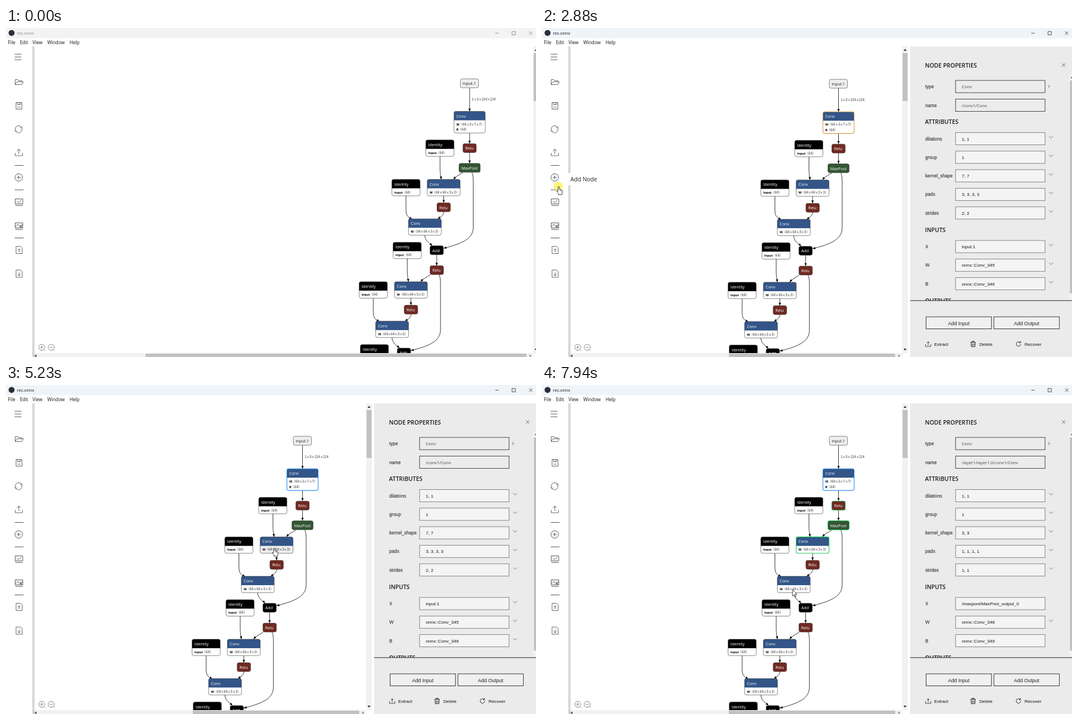
These frames come from a looping animation (950 px wide and 590 px high, 8 s). An HTML page with a canvas:

```html
<!DOCTYPE html>
<html lang="en">
<head>
<meta charset="utf-8">
<title>Graph editor</title>
<style>
html, body { margin: 0; width: 100%; height: 100%; overflow: hidden; background: #fff; }
canvas { display: block; }
</style>
</head>
<body>
<canvas width="950" height="590"></canvas>
<script>
const ctx = document.querySelector('canvas').getContext('2d');
const LOOP = 8000;
const UI = '"Open Sans", sans-serif', ARIAL = '"Liberation Sans", sans-serif', SHAPE = '"Noto Sans CJK SC", "Noto Sans CJK", sans-serif';
const BLUE = '#335588', RED = '#702921', GREEN = '#335533';

// Moments at which the state jumps
const T = { focus: 2170, slide: 2260, slid: 2500, menu1: 3720, pick1: 4300, select2: 5380, menu2: 6060, pick2: 7310 };

// Pointer track: time, x, y
const POINTER = [
  [300, 250, 592], [640, 96, 264], [1080, 420, 592],
  [1400, 330, 228], [1660, 607, 206], [2000, 815, 168], [2640, 820, 170], [2860, 30, 285], [2960, 30, 285],
  [3410, 718, 562], [3810, 720, 566], [3980, 720, 566], [4060, 721, 554], [4290, 721, 553], [4830, 486, 296], [5230, 481, 293],
  [5380, 481, 293], [5700, 660, 453], [5770, 660, 453], [6060, 724, 567], [6340, 724, 567], [6400, 723, 555],
  [6630, 724, 550], [6900, 724, 550], [7090, 721, 522], [7310, 721, 522], [7940, 449, 367]
];

const within = (t, a, b) => t >= a && t < b;
const lerp = (a, b, p) => a + (b - a) * p;

function text(s, x, y, size, family = UI, color = '#000', weight = 400, align = 'left') {
  ctx.font = `${weight} ${size}px ${family}`;
  ctx.fillStyle = color;
  ctx.textAlign = align;
  ctx.fillText(s, x, y);
}
function rect(x, y, w, h, fill, stroke, line = 1) {
  if (fill) { ctx.fillStyle = fill; ctx.fillRect(x, y, w, h); }
  if (stroke) { ctx.strokeStyle = stroke; ctx.lineWidth = line; ctx.strokeRect(x, y, w, h); }
}
function stroke(d, color = '#000', line = 0.9) {
  ctx.strokeStyle = color;
  ctx.lineWidth = line;
  ctx.stroke(new Path2D(d));
}
function fill(d, color) {
  ctx.fillStyle = color;
  ctx.fill(new Path2D(d));
}
function at(x, y, draw) {
  ctx.save();
  ctx.translate(x, y);
  draw();
  ctx.restore();
}
function clipped(x, y, w, h, draw) {
  ctx.save();
  ctx.beginPath();
  ctx.rect(x, y, w, h);
  ctx.clip();
  draw();
  ctx.restore();
}
function rounded(x, y, w, h, radii, color, border, line) {
  ctx.beginPath();
  ctx.roundRect(x, y, w, h, radii);
  if (color) { ctx.fillStyle = color; ctx.fill(); }
  if (border) { ctx.strokeStyle = border; ctx.lineWidth = line; ctx.stroke(); }
}

// Graph -----------------------------------------------------------------

function node(x, y, w, label, color, rows = [], mark, body = '#fff') {
  const h = rows.length ? 20 + 9.4 * rows.length : 16;
  if (rows.length) rounded(x, y, w, h, 3.3, body);
  rounded(x, y, w, 16, rows.length ? [3.3, 3.3, 0, 0] : 3.3, color);
  text(label, x + 4.3, y + 11, 7.2, UI, color === '#eee' ? '#222' : '#fff');
  rows.forEach(([name, shape], i) => {
    const base = y + 25 + 9.4 * i;
    text(name, x + 4.3, base, 5.6, UI, '#000', 700);
    const nameWidth = ctx.measureText(name).width;
    text(`〈${shape}〉`, x + 4.3 + nameWidth, base, 5.7, SHAPE, '#222');
  });
  rounded(x, y, w, h, 3.3, null, mark || '#333', mark ? 1.1 : 0.6);
}

// A curve ending in an arrowhead at (x, y) that points along `angle` degrees
function edge(d, x, y, angle = 90) {
  stroke(`${d} ${x},${y}`, '#000', 0.8);
  at(x, y, () => {
    ctx.rotate(angle * Math.PI / 180);
    fill('M0,0L-5,-2.1V2.1Z', '#000');
  });
}

function residualBlock(convMark, convBody) {
  edge('M778,230V250C778,260 779,266', 780, 271.5, 84);
  edge('M819,259C812,264 806,266', 802, 271.5, 130);
  edge('M717,301V326C717,336 720,339', 728, 343, 32);
  edge('M784.5,301L', 784.5, 313.5);
  edge('M785,329.5C784,336 780,338', 774, 342.5, 142);
  edge('M750.5,371.5C751,381 758,385', 764, 390.5, 45);
  edge('M835,259C838,265 837.5,272 837.5,290V358C837.5,380 812,388', 784.5, 395, 166);
  edge('M772,407L', 772, 426);
  const identity = [['input', '64']], weights = [['W', '64×64×3×3']];
  node(752.5, 200.8, 50.5, 'Identity', '#000', identity);
  node(691.7, 271.6, 50.5, 'Identity', '#000', identity);
  node(755, 271.6, 59, 'Conv', BLUE, weights, convMark, convBody);
  node(772.5, 313.6, 24.2, 'Relu', RED);
  node(721.3, 342.2, 59, 'Conv', BLUE, weights);
  node(760, 390.6, 24, 'Add', '#000');
  node(760, 426.2, 24.2, 'Relu', RED);
}

function graph(t) {
  const mark1 = t >= T.pick1 ? '#2b8ceb' : t >= T.focus ? '#d99a45' : null;
  const mark2 = t >= T.pick2 ? '#22c95a' : t >= T.select2 ? '#d99a45' : null;
  const pathMark = t >= T.pick2 ? '#22a94c' : null;
  edge('M831,107.5L', 831, 149.5);
  edge('M831,188L', 831, 207);
  edge('M831,223L', 831, 242.5);
  text('1×3×224×224', 835, 130, 5.7, SHAPE, '#222');
  node(814.5, 91.2, 32.5, 'input.1', '#eee');
  node(803, 149.5, 56, 'Conv', BLUE, [['W', '64×3×7×7'], ['B', '64']], mark1);
  node(819, 207.4, 24, 'Relu', RED, [], pathMark);
  for (let i = 0; i < 3; i++) {
    at(-58.7 * i, 183.5 * i, () => residualBlock(i ? null : mark2, !i && within(t, 4780, T.select2 + 60) ? '#eee' : '#fff'));
  }
  node(812, 242.8, 38, 'MaxPool', GREEN, [], pathMark);
}

function scrollbars(p) {
  const right = lerp(945, 645.5, p), end = lerp(933, 633, p);
  rect(49, 583, right - 49, 7, '#f1f1f1');
  rect(lerp(250, 335, p), 584, end - lerp(250, 335, p), 6, '#c1c1c1');
  fill('M51,588L54.5,585.5V590Z', '#333');
  fill(`M${end + 9},588L${end + 5.5},585.5V590Z`, '#888');
  rect(right, 33, 10.5, 550, '#f1f1f1');
  rect(right + 0.8, 45, 9, 86, '#c1c1c1');
  fill(`M${right + 2.5},41H${right + 8}L${right + 5.2},37.5Z`, '#333');
  fill(`M${right + 2.5},575H${right + 8}L${right + 5.2},578.5Z`, '#333');
}

// Window frame ------------------------------------------------------------

function frame(focused) {
  rect(0, 0, 950, 18.5, focused ? '#eff4f9' : '#f3f3f3');
  ctx.beginPath();
  ctx.arc(10, 8.8, 5.4, 0, 7);
  ctx.fillStyle = '#2b2e3a';
  ctx.fill();
  text('res.onnx', 19.5, 12, 7.7, UI, focused ? '#111' : '#8b8b8b');
  const tone = focused ? '#222' : '#777';
  stroke('M877,9.3H883M907,6.3h6v6h-6zM937.5,6.2l6,6m0,-6l-6,6', tone, 0.8);
  [['File', 3.5], ['Edit', 25], ['View', 47.5], ['Window', 74], ['Help', 114]]
    .forEach(([s, x]) => text(s, x, 29.3, 8.3, UI, '#111'));
}

function sidebar() {
  rect(0, 33, 48, 557, '#fff');
  const shade = ctx.createLinearGradient(47, 0, 53, 0);
  shade.addColorStop(0, '#0004');
  shade.addColorStop(1, '#0000');
  rect(47.5, 33, 6, 557, shade);
  const upload = 'M16.5,224v5h13v-5M23,226v-9m-3.5,3.5l3.5,-3.5l3.5,3.5';
  const page = 'M18,392v12.500h11v-10l-3,-3h-8zm5.500,10';
  const arrowUp = 'v-6m-2.500,2.500l2.500,-2.500l2.500,2.500';
  const ink = '#4d545c';
  stroke('M15.500,47h12M15.500,52h12M15.500,57h12', ink, 1);
  stroke('M16.500,101.500v-9h4.500l1.500,2h6v2M16.500,101.500l3,-5h11.500l-2.500,5z', ink);
  stroke('M18,133.500h10.500v12h-10.500zM20.500,133.500v4h5.500v-4M24,134.500v2M20.500,142h5.500', ink);
  stroke('M17.500,185A6.500,6.500 0 0 1 21.500,175.200M18.500,186.500A6.500,6.500 0 0 0 23.500,188M27.500,178A6.500,6.500 0 0 1 24,187.800M21,175.200A6.500,6.500 0 0 1 27,177M15.500,183.500l2,2.500l2.500,-1.500M29.500,179.500l-2,-2.500l-2.500,1.500', ink);
  stroke(upload, ink);
  stroke('M15.500,246.500h16M15.500,290.300h16M15.500,376.500h16', ink, 1);
  stroke('M16,268a6.700,6.700 0 1 0 13.400,0a6.700,6.700 0 1 0 -13.400,0M22.700,264.500v7M19.200,268h7', ink, 1);
  const screen = 'M16.500,306.500h13.500v9h-13.500zM16.500,318.300h13.500';
  stroke(screen + 'M20,311l2.500,2.500l4.500,-4.500', ink, 1);
  at(0, 43, () => stroke(screen + 'M17,313l4,-4l4,4l5,-4M25,311l4,4m0,-4l-4,4', ink, 1));
  stroke(page + arrowUp, ink);
  at(0, 42.500, () => stroke(page + 'v-6m-2.500,3.500l2.500,2.500l2.500,-2.500', ink));
  for (const [x, sign] of [[64, 'M-2.500,0h5M0,-2.500v5'], [81, 'M-2.500,0h5']]) {
    at(x, 572.6, () => stroke('M-5.300,0a5.300,5.300 0 1 0 10.600,0a5.300,5.300 0 1 0 -10.600,0M3.800,3.800l2.500,2.500' + sign, '#666', 0.8));
  }
}

// Property panel -----------------------------------------------------------

const FIELDS = {
  conv1: { name: '/conv1/Conv', values: ['1, 1', '1', '7, 7', '3, 3, 3, 3', '2, 2'], inputs: ['input.1', 'onnx::Conv_345', 'onnx::Conv_346'], open: [1, 1, 1] },
  conv2: { name: '/layer1/layer1.0/conv1/Conv', values: ['1, 1', '1', '3, 3', '1, 1, 1, 1', '1, 1'], inputs: ['/maxpool/MaxPool_output_0', 'onnx::Conv_348', 'onnx::Conv_349'], open: [0, 1, 0] }
};

function field(label, value, y, chevron, family = ARIAL) {
  const fixed = family === UI;
  text(label, 687, y + 14, 8.2, ARIAL, '#111');
  rect(741.3, y, 160.4, 22, fixed ? '#ececec' : '#f4f4f4', fixed ? '#333' : '#777', 0.9);
  text(value, 752.5, y + 14, fixed ? 7.7 : 8.1, family, fixed ? '#444' : '#111');
  if (chevron) stroke(`M909,${y + 6.5}l3.500,3.500l3.500,-3.500`, '#555', 0.8);
}
function heading(s, y) {
  text(s, 686.5, y, 10.4, UI, '#1a1a1a', 600);
}

function panel(t) {
  const data = t < T.select2 ? FIELDS.conv1 : FIELDS.conv2;
  rect(660, 33, 290, 557, '#ebebeb');
  heading('NODE PROPERTIES', 71.3);
  stroke('M932,63.500l6,6m0,-6l-6,6', '#555', 0.9);
  clipped(660, 80, 290, 409, () => {
    field('type', 'Conv', 94, false, UI);
    text('?', 907, 108, 8, UI, '#222');
    field('name', data.name, 127.5, false, UI);
    heading('ATTRIBUTES', 172);
    ['dilations', 'group', 'kernel_shape', 'pads', 'strides']
      .forEach((s, i) => field(s, data.values[i], 187.5 + 33.3 * i, true));
    heading('INPUTS', 366);
    ['X', 'W', 'B'].forEach((s, i) => field(s, data.inputs[i], 381 + 33.3 * i, data.open[i]));
    heading('OUTPUTS', 492.5);
    rect(945.5, 82, 4.5, 407, '#f1f1f1');
    rect(946.3, 94, 3.7, 382, '#c1c1c1');
    fill('M947.500,90H950V87Z', '#555');
  });
  stroke('M660,488.900H950', '#222', 1);
  rect(688.4, 518, 117.3, 21.5, '#f0f0f0', '#222', 0.9);
  rect(810, 518, 117.3, 21.5, '#f0f0f0', '#222', 0.9);
  text('Add Input', 747, 532.5, 9, ARIAL, '#222', 400, 'center');
  text('Add Output', 868.5, 532.5, 9, ARIAL, '#222', 400, 'center');
  stroke('M687.500,567v4h9.500v-4M692.200,569v-6.500m-2.500,2.500l2.500,-2.500l2.500,2.500', '#333', 0.9);
  stroke('M768,563.500h9M771,563.500v-1.800h3.500v1.800M769,563.500l0.500,8h6.500l0.500,-8M771.500,565.500v4.500M774,565.500v4.500', '#222', 1);
  stroke('M857,564a4,4 0 1 0 1,3M855,564.500h2.800v-3', '#222', 1);
  text('Extract', 703, 570.2, 8.1, ARIAL, '#111');
  text('Delete', 784, 570.2, 8.1, ARIAL, '#111');
  text('Recover', 865, 570.2, 8.1, ARIAL, '#111');
}

function menu(t) {
  const open = within(t, T.menu1, T.pick1) || within(t, T.menu2, T.pick2);
  if (!open) return;
  let hover = -1;
  if (within(t, 4040, T.pick1) || within(t, 6400, 6990)) hover = 2;
  else if (t >= 6990) hover = 1;
  ['Extract', 'Extract Net End', 'Extract Net Start'].forEach((s, i) => {
    const y = 478.3 + 28 * i;
    rect(687.5, y, 152.7, 28, i === hover ? '#007bff' : '#fff', '#0a73d9', 1);
    text(s, 690.5, y + 17, 8.1, ARIAL, '#111');
  });
}

// Pointer --------------------------------------------------------------------

function pointer(t) {
  if (t < 300 || within(t, 1080, 1400)) return;
  const next = POINTER.findIndex(k => k[0] > t);
  const b = next < 0 ? POINTER.at(-1) : POINTER[next];
  const a = next < 0 ? b : POINTER[next - 1];
  const p = next < 0 ? 0 : (t - a[0]) / (b[0] - a[0]);
  const hand = within(t, 1980, T.slide) || within(t, 2840, 2980) || within(t, 4780, T.select2 + 40);
  at(lerp(a[1], b[1], p), lerp(a[2], b[2], p), () => {
    const d = hand
      ? 'M-1.200,0Q0,-1.200 1.200,0V4.500L5.500,5.500Q7,6 6.800,8L6,11V14H-0.500V12L-4,7.800Q-4,6.300 -1.200,8Z'
      : 'M0,0V11.500L2.700,9L4.600,13.200L6.400,12.400L4.600,8.300H8.200Z';
    fill(d, '#fff');
    stroke(d, '#111', 0.8);
    if (hand) stroke('M2.800,5v3M4.700,5.500v2.500', '#333', 0.6);
  });
}

function addNodeHint(t) {
  if (!within(t, 2840, 2990)) return;
  rect(47, 260, 57, 22, '#fff');
  text('Add Node', 51, 275, 10.3, UI, '#222');
  ctx.beginPath();
  ctx.arc(29, 284, 8, 0, 7);
  ctx.fillStyle = '#fff04ecc';
  ctx.fill();
}

function draw(t) {
  const p = Math.min(1, Math.max(0, (t - T.slide) / (T.slid - T.slide)));
  rect(0, 0, 950, 590, '#fff');
  clipped(48, 33, lerp(897, 597.5, p), 550, () => at(-299.5 * p, 0.8 * p, () => graph(t)));
  scrollbars(p);
  if (p > 0) at(290 * (1 - p), 0, () => panel(t));
  sidebar();
  frame(t >= T.focus);
  menu(t);
  addNodeHint(t);
  pointer(t);
}

const start = performance.now();
function tick() {
  draw((performance.now() - start) % LOOP);
  requestAnimationFrame(tick);
}
tick();
</script>
</body>
</html>
```
